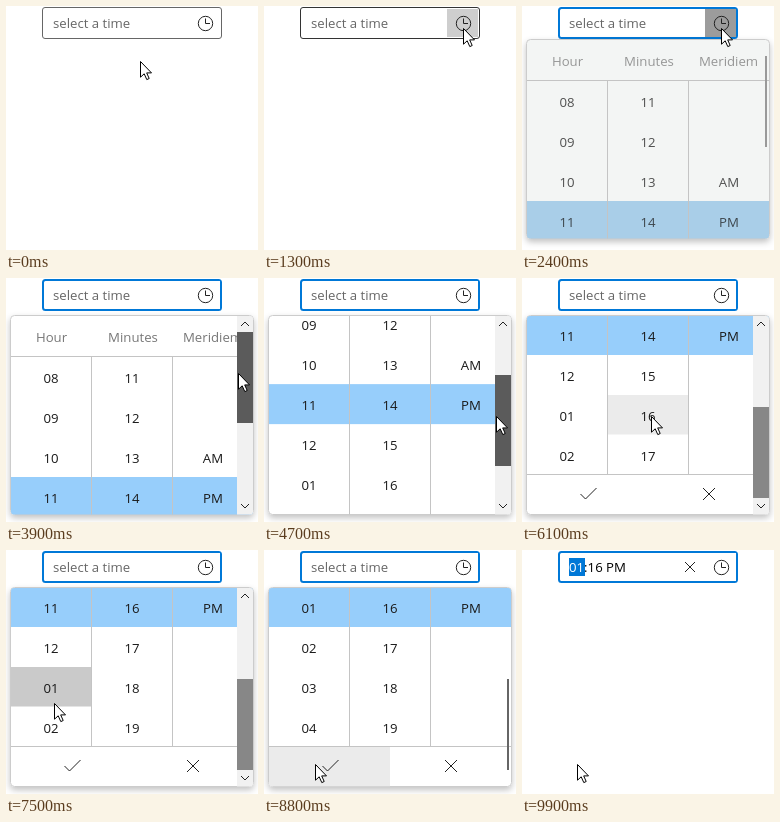
An HTML page that plays this animation: 252 by 244 pixels, repeating every 10000 ms.

```html
<!DOCTYPE html>
<html lang="en">
<head>
<meta charset="utf-8">
<title>Time picker</title>
<style>
html, body { margin: 0; width: 100%; height: 100%; overflow: hidden; background: #fff; }
svg { display: block; width: 252px; height: 244px; }
text { font: 13.2px "Open Sans", "Noto Sans", sans-serif; }
.mid { text-anchor: middle; }
.line { fill: none; stroke: #222; stroke-width: 1; }
</style>
</head>
<body>
<svg id="stage" viewBox="0 0 252 244">
  <defs>
    <filter id="shadow" x="-10%" y="-10%" width="120%" height="120%">
      <feDropShadow dx="0" dy="3" stdDeviation="3" flood-opacity=".24"/>
    </filter>
    <clipPath id="view"><rect x="5" y="38" width="242" height="198.5" rx="3"/></clipPath>
  </defs>

  <g id="field">
    <rect id="frame" fill="#fff"/>
    <rect id="button" x="183" y="3" width="31" height="28"/>
    <rect id="marked" x="47" y="8" width="16" height="18" fill="#0078d7"/>
    <text id="hint" x="47" y="22" fill="#666">select a time</text>
    <text id="value" x="47" y="22"><tspan fill="#fff">01</tspan>:16 PM</text>
    <path id="clear" class="line" d="M163 12l10 10m0-10l-10 10"/>
    <g class="line" stroke-width="1.2">
      <circle cx="199.5" cy="17.5" r="7.2"/>
      <path d="M199.5 12.5v5h4.5"/>
    </g>
  </g>

  <g id="popup">
    <rect id="sheet" x="4.5" y="37.5" width="243" height="199" rx="4" stroke="#ccc" filter="url(#shadow)"/>
    <g clip-path="url(#view)">
      <g id="content">
        <rect id="band" x="5" y="199" width="242" height="40"/>
        <rect id="hover" height="39.5"/>
        <path id="rules" fill="none" stroke="#c4c4c4" d="M5 78.5H247M85.5 79V358M166.5 79V358M5 358.5H247"/>
        <g id="labels"></g>
        <path class="line" d="M58.5 378l5 5 11-11M181 372l12 12m0-12l-12 12"/>
      </g>
      <rect id="track" y="38" width="16" height="199" fill="#f1f1f1"/>
      <rect id="thumb" height="91"/>
      <path id="arrows" class="line" stroke-width="1.2" d="M235 48l4-4 4 4M235 226l4 4 4-4"/>
    </g>
  </g>

  <path id="cursor" fill="#fff" stroke="#000" d="M.5 .5V16.2L4.2 12.8 6.8 18.6 9.2 17.5 6.7 11.9H11.5Z"/>
</svg>
<script>
const LOOP = 10000, STEP = 100, SCROLL_RATIO = 162 / 75;
const $ = id => document.getElementById(id);
const NS = 'http://www.w3.org/2000/svg';

const set = (id, attrs) => {
  for (const k in attrs) $(id).setAttribute(k, attrs[k]);
};
const show = (id, on) => set(id, { visibility: on ? 'visible' : 'hidden' });
const clamp = v => Math.max(0, Math.min(1, v));
const ramp = (t, a, b) => clamp((t - a) / (b - a));
const smooth = p => p * p * (3 - 2 * p);
const mix = (a, b, p) => a + (b - a) * p;
const grey = v => `rgb(${v},${v},${v})`;

// Keys are [time, ...values]
function track(keys, t, ease = smooth) {
  let i = 0;
  while (i < keys.length - 2 && t >= keys[i + 1][0]) i++;
  const a = keys[i], b = keys[i + 1];
  const p = ease(ramp(t, a[0], b[0]));
  return a.slice(1).map((v, n) => mix(v, b[n + 1], p));
}

const MOVES = [
  [400, 134, 55], [1000, 193, 29], [1100, 193, 29], [1300, 199, 22],
  [2600, 199, 22], [3300, 232, 95], [5600, 232, 95], [6100, 129, 138],
  [6800, 129, 138], [7200, 48, 153], [8200, 48, 153], [8800, 51, 214],
  [9700, 51, 214], [9900, 55, 214]
];
const DRAG = [
  [4000, 0], [4200, 1], [4400, 1], [4500, 7], [4600, 23], [4700, 43],
  [4800, 57], [4900, 65], [5000, 70], [5100, 73], [5200, 75]
];

function label(x, y, str, fill = '#1a1a1a') {
  const el = document.createElementNS(NS, 'text');
  el.setAttribute('class', 'mid');
  el.setAttribute('x', x);
  el.setAttribute('y', y);
  el.setAttribute('fill', fill);
  el.textContent = str;
  $('labels').append(el);
  return el;
}

const rowY = i => 79 + 40 * i;
['Hour', 'Minutes', 'Meridiem'].forEach((s, i) => label([45.5, 127, 206.5][i], 64, s, '#777'));
const hours = [], minutes = [];
for (let i = 0; i < 7; i++) {
  hours.push(label(45, rowY(i) + 25.7, ''));
  minutes.push(label(126, rowY(i) + 25.7, ''));
}
label(207, rowY(2) + 25.7, 'AM');
label(207, rowY(3) + 25.7, 'PM');

function cursorAt(t, drag) {
  const [x, y] = track(MOVES, t);
  return [x, y + drag * (1 - smooth(ramp(t, 5600, 6100)))];
}

function drawField(t, x, y) {
  const focus = t >= 2200, done = t >= 9400;
  const inside = x > 36 && x < 216 && y < 33;
  set('frame', focus
    ? { x: 37, y: 2, width: 178, height: 30, rx: 2.5, stroke: '#0078d7', 'stroke-width': 2 }
    : { x: 36.5, y: 1.5, width: 179, height: 31, rx: 2.5, stroke: inside ? '#333' : '#666', 'stroke-width': 1 });
  const over = inside && x > 183;
  set('button', { fill: over ? grey(Math.round(mix(206, 156, ramp(t, 1700, 1900)))) : '#fff' });
  show('hint', !done);
  for (const id of ['value', 'marked', 'clear']) show(id, done);
}

function drawHover(t, x, y, scroll) {
  const dragging = t < 5600;
  const left = y >= 197 && x < 126;
  const on = !dragging && x < 166 && y > 37 && (y < 197 || left);
  show('hover', on && t < 9500);
  if (!on) return;
  const pressed = (t >= 6400 && t < 6600) || (t >= 7500 && t < 8000) || t >= 9200;
  const row = Math.floor((y + scroll - 79) / 40);
  const col = x < 85.5 ? 0 : 1;
  set('hover', {
    x: left || !col ? 5 : 86,
    width: left ? 121 : 80,
    y: left ? 359 : rowY(row),
    fill: pressed ? '#cacaca' : '#ebebeb'
  });
}

function drawBar(t, offset) {
  const wide = ramp(t, 3400, 3700) * (1 - ramp(t, 7500, 7800));
  const held = t >= 3900 && t < 5700;
  set('track', { x: mix(243, 231, wide), opacity: wide });
  set('thumb', {
    x: mix(243, 231, wide),
    y: 54 + offset,
    width: mix(2, 16, wide),
    fill: held ? '#5b5b5b' : wide > 0 ? '#878787' : t < 3400 ? '#999' : '#666'
  });
  set('arrows', { opacity: wide });
}

function drawPopup(t, x, y, offset) {
  const on = t >= 2400 && t < 9500;
  show('popup', on);
  if (!on) { show('hover', false); return; }
  const open = ramp(t, 2400, 2700);
  const scroll = offset * SCROLL_RATIO;
  set('popup', {
    transform: `translate(0 ${mix(-4, 0, smooth(open))})`,
    opacity: t >= 9400 ? .4 : 1
  });
  set('sheet', { fill: `rgb(${mix(243, 255, open)},${mix(245, 255, open)},${mix(244, 255, open)})` });
  set('band', { fill: `rgb(${mix(169, 151, open)},${mix(206, 206, open)},${mix(232, 251, open)})` });
  set('labels', { opacity: mix(.75, 1, open) });
  set('content', { transform: `translate(0 ${-scroll})` });

  const firstHour = t >= 7700 ? 10 : 8, firstMinute = t >= 6600 ? 13 : 11;
  hours.forEach((el, i) => {
    el.textContent = String((firstHour + i - 1) % 12 + 1).padStart(2, '0');
  });
  minutes.forEach((el, i) => { el.textContent = firstMinute + i; });
  drawHover(t, x, y, scroll);
  drawBar(t, offset);
}

function draw(ms) {
  const t = Math.floor(ms % LOOP / STEP) * STEP;
  const [offset] = track(DRAG, t, p => p);
  const [x, y] = cursorAt(t, offset);
  drawField(t, x, y);
  drawPopup(t, x, y, offset);
  set('cursor', { transform: `translate(${Math.round(x)} ${Math.round(y)})` });
}

const start = performance.now();
function tick() {
  draw(performance.now() - start);
  requestAnimationFrame(tick);
}
tick();
</script>
</body>
</html>
```
